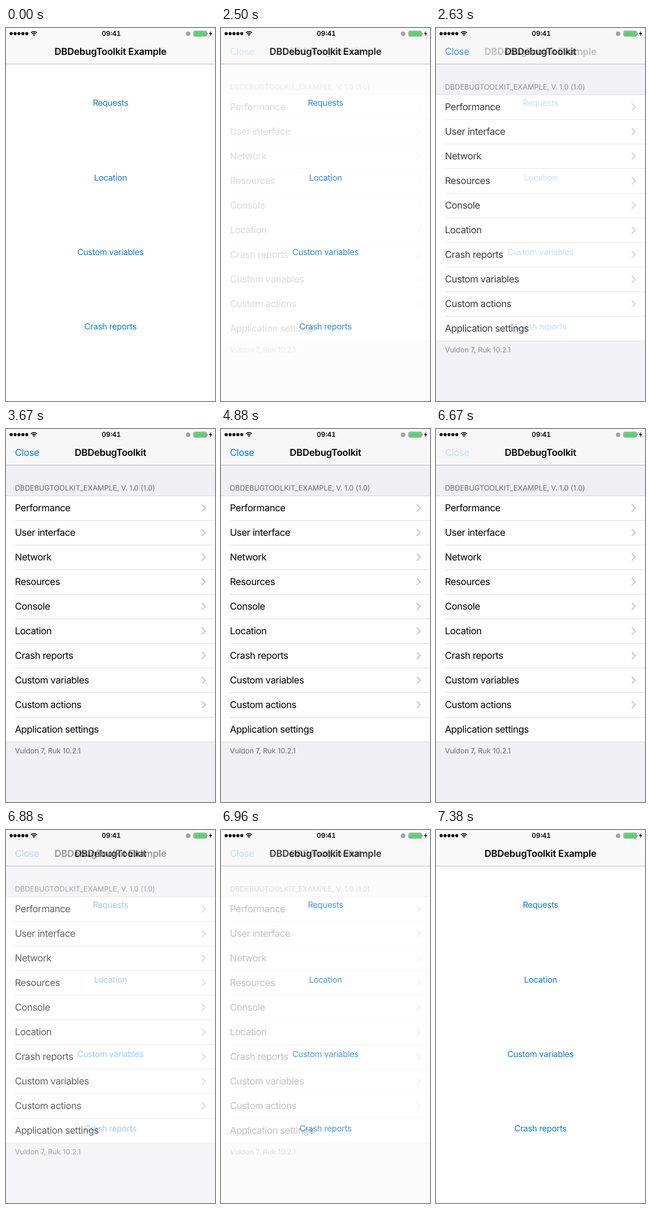
Recreate the animation shown at these times as an HTML page. Size 375 by 667 pixels, loop 8.29 s.

```html
<!DOCTYPE html>
<html lang="en">
<head>
<meta charset="utf-8">
<title>Debug toolkit menu</title>
<style>
  html, body { margin: 0; width: 100%; height: 100%; overflow: hidden; background: #fff; }
  svg { display: block; width: 375px; height: 667px; }
  text { font: 400 17px Inter, Roboto, sans-serif; letter-spacing: -.41px; text-rendering: geometricPrecision; }
  .title { font-weight: 600; letter-spacing: -.25px; text-anchor: middle; }
  .link { font-size: 15px; letter-spacing: -.24px; text-anchor: middle; fill: #067bee; }
  .note { font-size: 13px; letter-spacing: -.08px; fill: #6d6d72; }
  .clock { font-size: 12px; font-weight: 600; letter-spacing: 0; text-anchor: middle; font-variant-numeric: tabular-nums; }
  .chevron { fill: none; stroke: #c7c7cc; stroke-width: 2; }
  #close { fill: #067bee; }
</style>
</head>
<body>
<svg viewBox="0 0 375 667">
  <g id="home">
    <rect width="375" height="667" fill="#fff"/>
    <rect width="375" height="64" fill="#f9f9f9"/>
    <rect y="64" width="375" height="1" fill="#bebebe"/>
    <text class="title" x="187.4" y="48">DBDebugToolkit Example</text>
  </g>

  <g id="menu" opacity="0">
    <rect width="375" height="667" fill="#efeff4"/>
    <rect width="375" height="64" fill="#f7f7f8"/>
    <rect y="64" width="375" height="1" fill="#bcbcbf"/>
    <text id="close" x="16" y="48">Close</text>
    <text class="title" x="187.4" y="48">DBDebugToolkit</text>
    <text class="note" x="16" y="109.5">DBDEBUGTOOLKIT_EXAMPLE, V. 1.0 (1.0)</text>
    <rect y="119.5" width="375" height="440" fill="#fff"/>
    <rect y="119" width="375" height="1" fill="#d8d8dc"/>
    <rect y="559" width="375" height="1" fill="#d8d8dc"/>
    <text class="note" x="16" y="579.5">Vuldon 7, Ruk 10.2.1</text>
  </g>

  <g id="status">
    <path d="M9.25 10.1h28.1" stroke="#000" stroke-width="5.6" stroke-linecap="round" stroke-dasharray="0 7"/>
    <g fill="none" stroke="#000" stroke-width="1.6">
      <path d="M44.6 8.6a7.8 7.8 0 0 1 11 0"/>
      <path d="M46.7 10.8a4.8 4.8 0 0 1 6.8 0"/>
    </g>
    <path d="M50.1 14.1l-1.9-1.9a2.7 2.7 0 0 1 3.8 0z"/>
    <text class="clock" x="189" y="14.3">09:41</text>
    <circle cx="326.8" cy="10.2" r="4" fill="#a3a3a5"/>
    <rect x="336.8" y="5.6" width="23" height="9" rx="1.8" fill="#fff" stroke="#505052" stroke-width=".8"/>
    <rect x="337.6" y="6.4" width="21.4" height="7.4" rx="1" fill="#4cd964"/>
    <path d="M360.6 8.4a1.8 1.8 0 0 1 0 3.4z" fill="#444"/>
    <path d="M368 5l-3.8 5.7h2.6l-1 4.3 4-5.9h-2.7z"/>
  </g>
</svg>

<script>
const LOOP = 8290, OPEN = 2500, TAP = 6580, DISMISS = 6830, STEP = 42;
const $ = id => document.getElementById(id);
const home = $('home'), menu = $('menu'), close = $('close');

function add(parent, tag, attrs, text = '') {
  const el = document.createElementNS('http://www.w3.org/2000/svg', tag);
  for (const key in attrs) el.setAttribute(key, attrs[key]);
  el.textContent = text;
  parent.append(el);
}

['Requests', 'Location', 'Custom variables', 'Crash reports'].forEach((label, i) =>
  add(home, 'text', { class: 'link', x: 187.5, y: Math.round((i + 1) * 266.8 + 11.2) / 2 }, label));

const rows = ['Performance', 'User interface', 'Network', 'Resources', 'Console', 'Location',
  'Crash reports', 'Custom variables', 'Custom actions', 'Application settings'];
rows.forEach((label, i) => {
  const y = 119 + i * 44;
  add(menu, 'text', { x: 16, y: y + 28 }, label);
  if (i === rows.length - 1) return;
  add(menu, 'rect', { x: 16, y: y + 44, width: 359, height: 1, fill: '#dedee1' });
  add(menu, 'path', { class: 'chevron', d: `M351.3 ${y + 16}l6.2 6.2 -6.2 6.2` });
});

function fade(t) {
  if (t < 0) return 0;
  const n = Math.floor((t + 2) / STEP);
  if (n >= 17) return 1;
  const x = 0.65 + 0.7 * n;
  return 1 - (1 + x) * Math.exp(-x);
}

function closeAlpha(t) {
  if (t < TAP) return 1;
  if (t < DISMISS) return [0.7, 0.42, 0.2][Math.min(2, Math.floor((t - TAP) / 45))];
  return Math.min(1, 0.2 + 0.22 * Math.floor((t - DISMISS + 2) / STEP));
}

const start = performance.now();
function draw() {
  const t = (performance.now() - start) % LOOP;
  menu.setAttribute('opacity', t < DISMISS ? fade(t - OPEN) : 1 - fade(t - DISMISS));
  close.setAttribute('opacity', closeAlpha(t));
  requestAnimationFrame(draw);
}
draw();
</script>
</body>
</html>
```
